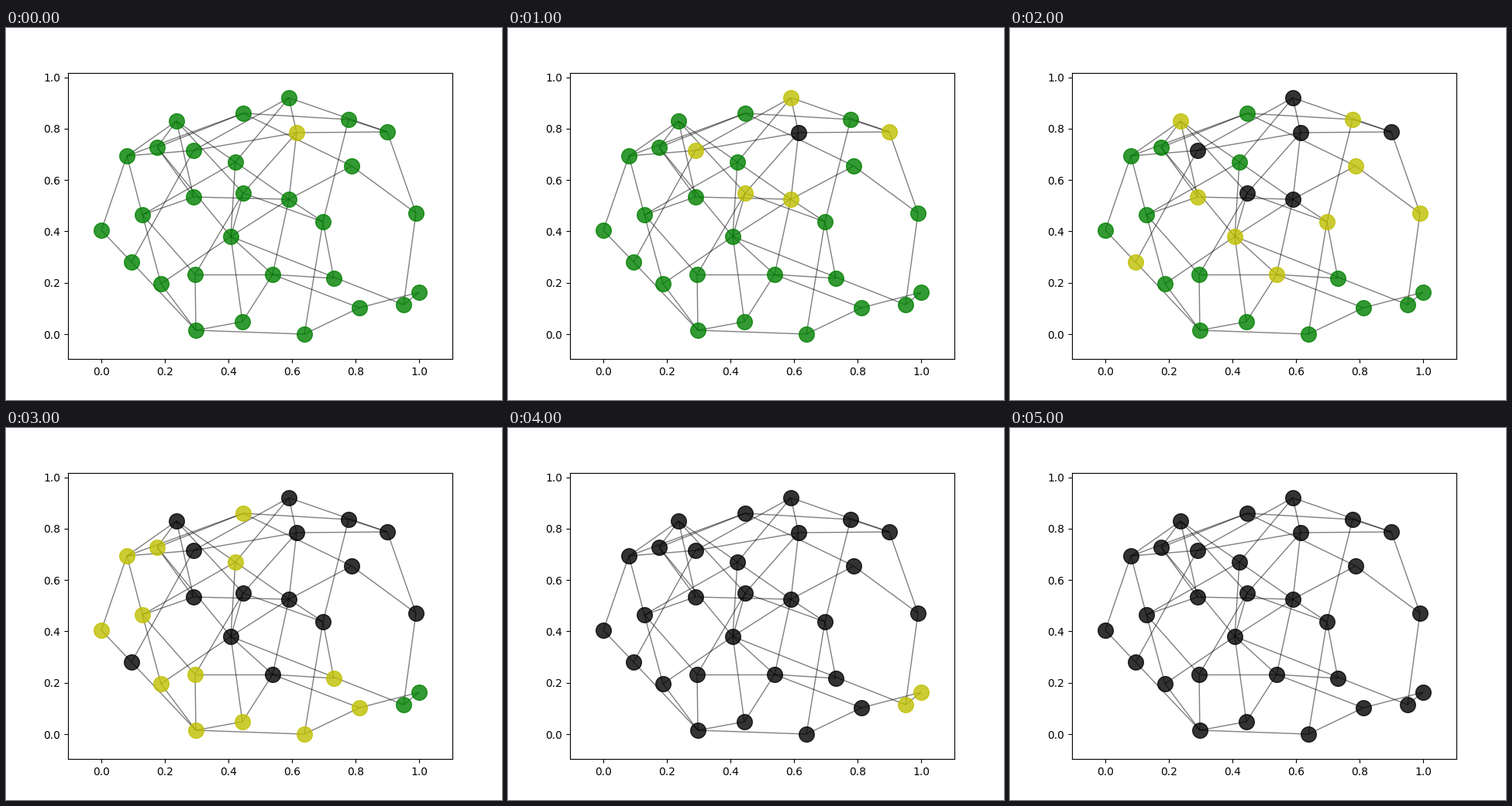
Write a matplotlib script that moves like this. It is 640x480 px and loops after 6 s.

```python
import matplotlib.pyplot as plt
import numpy as np
from matplotlib.animation import FuncAnimation
from matplotlib.collections import LineCollection

STEPS = 6
HEIGHT = 0.9212  # vertical extent of the layout; the horizontal one is 1

# name: (stage x, stage y, step at which the node is reached)
NODES = {
    "a": (123, 261, 3), "b": (156, 165, 3), "c": (195, 154, 3),
    "d": (220, 120, 2), "e": (242, 158, 1), "f": (306, 110, 3),
    "g": (365, 90, 1), "h": (375, 135, 0), "i": (442, 118, 2),
    "j": (492, 134, 1), "k": (446, 178, 2), "l": (529, 239, 2),
    "m": (296, 173, 3), "n": (242, 218, 2), "o": (306, 213, 1),
    "p": (365, 221, 1), "q": (409, 250, 2), "r": (176, 241, 3),
    "s": (162, 302, 2), "t": (200, 330, 3), "u": (244, 318, 3),
    "v": (290, 269, 2), "w": (344, 318, 2), "x": (423, 323, 3),
    "y": (456, 361, 3), "z": (513, 357, 4), "A": (533, 341, 4),
    "B": (245, 390, 3), "C": (305, 379, 3), "D": (385, 395, 3),
}

LINKS = """
    ab as bd be bf br cd cf cn cv dm dn do eg eh es fi fk gh gj gm
    hj ho hp ij iq jl kl kp lz mp mr mv np nr oq ou ov pq pv pw
    qx qD rt ru sB tv tB uw uB vw vz vC wx wy wC yA yD zA BC BD
""".split()


def to_data(x, y):
    return (x - 123.04) / 409.92, (395.13 - y) / 331.65


pos = {name: to_data(x, y) for name, (x, y, _) in NODES.items()}
points = np.array(list(pos.values()))
reached = np.array([step for _, _, step in NODES.values()])

fig, ax = plt.subplots(figsize=(6.4, 4.8), dpi=100)
ax.set_xlim(-0.105, 1.105)
ax.set_ylim(-0.105 * HEIGHT, 1.105 * HEIGHT)
ticks = np.linspace(0, 1, 6)
ax.set_xticks(ticks)
ax.set_yticks(ticks)

ax.add_collection(LineCollection([(pos[a], pos[b]) for a, b in LINKS],
                                 colors="k", linewidths=1, alpha=0.5, zorder=1),
                  autolim=False)


def dots(color):
    return ax.scatter([], [], s=200, c=color, linewidths=1, alpha=0.8, zorder=2)


waiting, active, done = dots("g"), dots("y"), dots("k")


def update(step):
    waiting.set_offsets(points[reached > step])
    active.set_offsets(points[reached == step])
    done.set_offsets(points[reached < step])
    return waiting, active, done


anim = FuncAnimation(fig, update, frames=STEPS, interval=1000, repeat=True,
                     repeat_delay=0, init_func=lambda: update(0))
plt.show()
```
